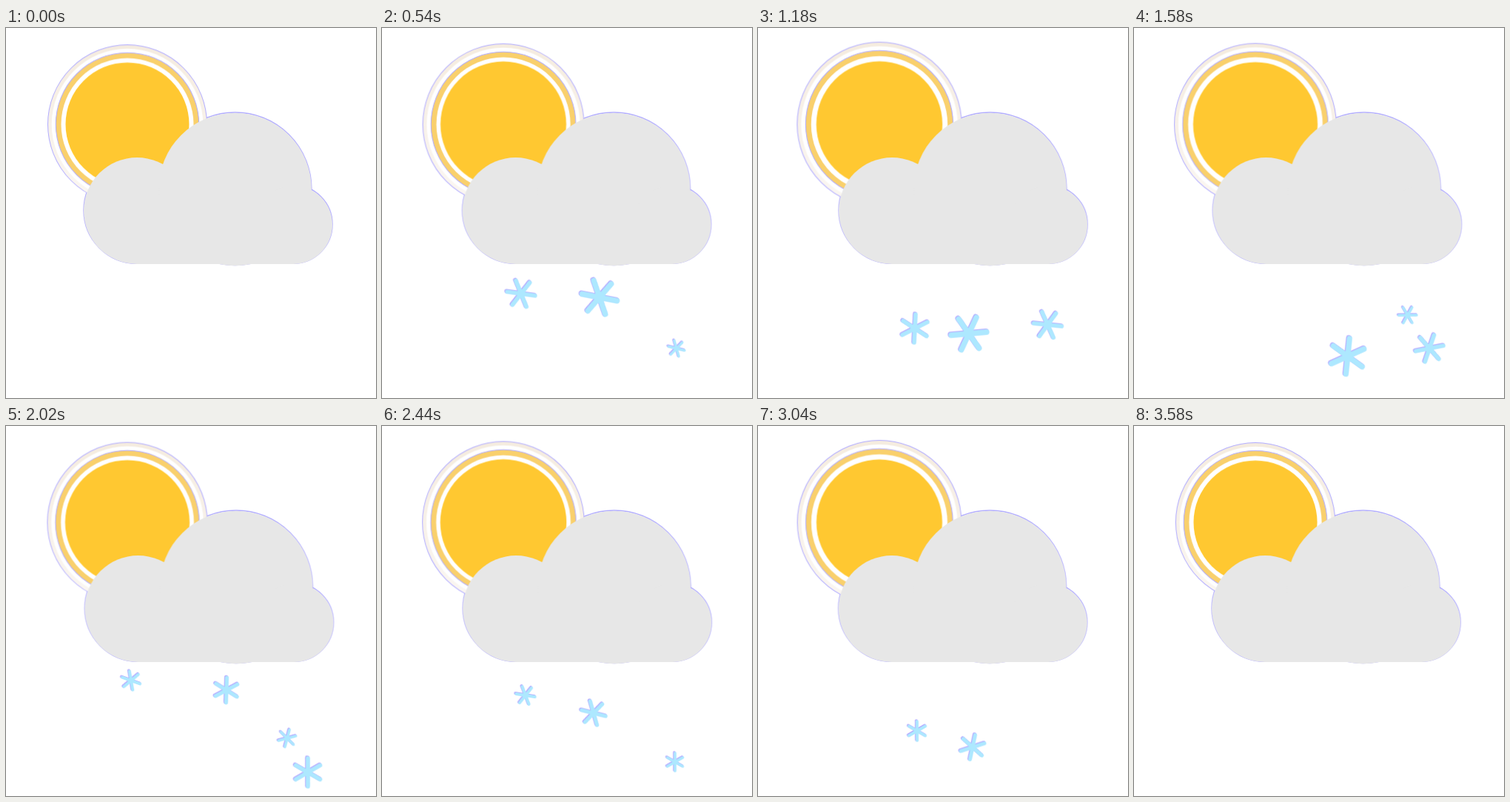
Write an HTML page without scripts that moves like this. It is 500 px wide and 500 px high and loops after 3600 ms.

```html
<!DOCTYPE html>
<html lang="en">
<head>
<meta charset="utf-8">
<title>Sun, cloud and snow</title>
<style>
  html, body { margin: 0; width: 100%; height: 100%; overflow: hidden; background: #fff; }
  svg { display: block; width: 100vw; height: 100vh; }

  .edge { stroke: #b0abff; }
  .disc { fill: #ffc831; animation: swell .9s linear infinite alternate; }
  .ring { animation: pulse 1.8s linear infinite; }
  .inner { --grow: .032; }
  .outer { --grow: .0352; }
  .cloud { animation: drift .9s linear infinite alternate; }

  @keyframes swell { to { transform: scale(1.03); } }
  @keyframes drift { to { transform: translateX(6px); } }
  @keyframes pulse {
    0%, 100% { transform: scale(1); }
    30% { transform: scale(calc(1 + .37 * var(--grow))); }
    63% { transform: scale(calc(1 + var(--grow))); }
    90% { transform: scale(calc(1 + .45 * var(--grow))); }
  }

  /* Each flake pops in, drifts down while turning, and pops out. */
  .snow { filter: drop-shadow(-.9px -.9px 0 #b5abff); }
  .flake { opacity: 0; animation: 3.6s linear infinite; }
  .left1 { animation-name: left1; }
  .left2 { animation-name: left2; }
  .mid1 { animation-name: mid1; }
  .mid2 { animation-name: mid2; }
  .right1 { animation-name: right1; }
  .right2 { animation-name: right2; }
  .right3 { animation-name: right3; }

  @keyframes left1 {
    0%, 4.2% { opacity: 0; transform: translate(164px, 336px) rotate(22deg); }
    4.21% { opacity: 1; }
    15% { transform: translate(188px, 359px) rotate(8deg); }
    32.78% { transform: translate(212px, 406px) rotate(-27deg); }
    39% { opacity: 1; transform: translate(219px, 423px) rotate(-39deg); }
    39.01%, 100% { opacity: 0; }
  }
  @keyframes mid1 {
    0%, 8.33% { opacity: 0; transform: translate(298px, 346px) rotate(16deg); }
    8.34% { opacity: 1; }
    15% { transform: translate(294px, 364px) rotate(11deg); }
    32.78% { transform: translate(285px, 413px) rotate(-5deg); }
    44.4% { opacity: 1; transform: translate(289px, 445px) rotate(-25deg); }
    44.41%, 100% { opacity: 0; }
  }
  @keyframes right1 {
    0%, 2.78% { opacity: 0; transform: translate(380px, 400px) rotate(32deg); }
    2.79% { opacity: 1; }
    15% { transform: translate(398px, 433px) rotate(14deg); }
    27.2% { opacity: 1; transform: translate(404px, 467px) rotate(-6deg); }
    27.21%, 100% { opacity: 0; }
  }
  @keyframes right2 {
    0%, 21.8% { opacity: 0; transform: translate(382px, 370px) rotate(22deg); }
    21.81% { opacity: 1; }
    32.78% { transform: translate(391.5px, 401px) rotate(6deg); }
    56.11% { transform: translate(408px, 468px) rotate(-30deg); }
    57.9% { opacity: 1; transform: translate(409px, 473px) rotate(-33deg); }
    57.91%, 100% { opacity: 0; }
  }
  @keyframes left2 {
    0%, 52.8% { opacity: 0; transform: translate(163px, 337px) rotate(23deg); }
    52.81% { opacity: 1; }
    56.11% { transform: translate(169px, 344px) rotate(20deg); }
    67.78% { transform: translate(194px, 364px) rotate(9deg); }
    84.44% { transform: translate(215px, 412px) rotate(-30deg); }
    89.2% { opacity: 1; transform: translate(219px, 426px) rotate(-40deg); }
    89.21%, 100% { opacity: 0; }
  }
  @keyframes mid2 {
    0%, 52.8% { opacity: 0; transform: translate(301px, 348px) rotate(37deg); }
    52.81% { opacity: 1; }
    56.11% { transform: translate(298px, 357px) rotate(32deg); }
    67.78% { transform: translate(286px, 388px) rotate(14deg); }
    84.44% { transform: translate(290px, 434px) rotate(-18deg); }
    88.9% { opacity: 1; transform: translate(292px, 446px) rotate(-27deg); }
    88.91%, 100% { opacity: 0; }
  }
  @keyframes right3 {
    0%, 41.7% { opacity: 0; transform: translate(368px, 382px) rotate(62deg); }
    41.71% { opacity: 1; }
    56.11% { transform: translate(380px, 422px) rotate(45deg); }
    67.78% { transform: translate(396px, 454px) rotate(30deg); }
    76.9% { opacity: 1; transform: translate(404px, 479px) rotate(18deg); }
    76.91%, 100% { opacity: 0; }
  }
</style>
</head>
<body>
<svg viewBox="0 0 500 500">
  <defs>
    <g id="cloud">
      <circle cx="177" cy="247" r="72"/>
      <circle cx="309.5" cy="218" r="103.3"/>
      <circle cx="388" cy="266" r="53"/>
      <path d="M177 240H388V319H177Z"/>
    </g>
    <path id="flake" fill="none" stroke="#ade8ff" stroke-width=".26" stroke-linecap="round"
      d="M-.86 0H.86M-.43 -.745L.43 .745M-.43 .745L.43 -.745"/>
    <linearGradient id="haze" x2="0" y2="1">
      <stop offset="0" stop-color="#f5ecdf"/>
      <stop offset="1" stop-color="#fbf7f3"/>
    </linearGradient>
  </defs>

  <g class="cloud">
    <use href="#cloud" class="edge" fill="none" stroke-width="1.4" transform="translate(0 -.7)"/>
  </g>

  <g transform="translate(164 130.2)">
    <g class="ring outer">
      <circle class="edge" r="107.5" fill="url(#haze)"/>
      <circle r="102.3" fill="#fff"/>
    </g>
    <g class="ring inner">
      <circle class="edge" r="96.7" fill="#f9d06c"/>
      <circle r="89.5" fill="#fff"/>
    </g>
    <circle class="disc" r="83.5"/>
  </g>

  <g class="snow">
    <g class="flake left1"><use href="#flake" transform="scale(22)"/></g>
    <g class="flake left2"><use href="#flake" transform="scale(15)"/></g>
    <g class="flake mid1"><use href="#flake" transform="scale(28)"/></g>
    <g class="flake mid2"><use href="#flake" transform="scale(19.5)"/></g>
    <g class="flake right1"><use href="#flake" transform="scale(13)"/></g>
    <g class="flake right2"><use href="#flake" transform="scale(22)"/></g>
    <g class="flake right3"><use href="#flake" transform="scale(14)"/></g>
  </g>

  <g class="cloud"><use href="#cloud" fill="#e7e7e7"/></g>
</svg>
</body>
</html>
```
